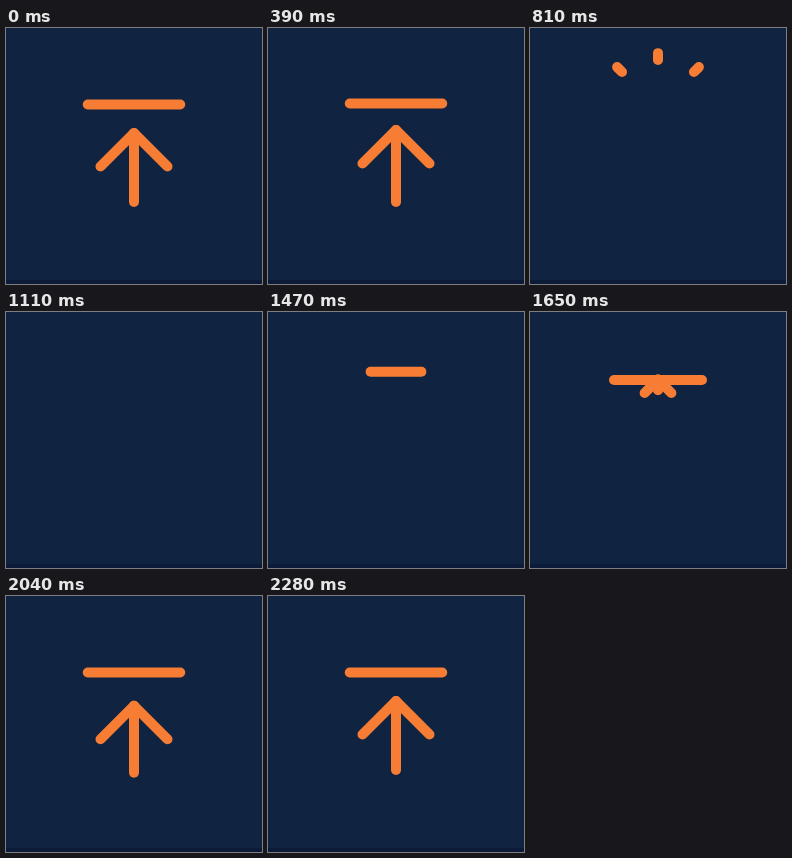
Recreate the animation shown at these times as an HTML page with a canvas. Size 256 px wide and 256 px high, loop 2.73 s.

```html
<!DOCTYPE html>
<html lang="en">
<head>
<meta charset="utf-8">
<title>Upload arrow</title>
<style>
html, body { margin: 0; width: 100%; height: 100%; overflow: hidden; background: #102341; }
canvas { display: block; width: 100vw; height: 100vh; }
</style>
</head>
<body>
<canvas id="stage"></canvas>
<script>
const SIZE = 256, LOOP = 2730, STEP = 30, CX = 128;
const canvas = document.getElementById('stage');
const ctx = canvas.getContext('2d');

const clamp = p => Math.min(1, Math.max(0, p));
const sine = p => (1 - Math.cos(Math.PI * p)) / 2;
const easeIn = n => p => p ** n;
const easeOut = n => p => 1 - (1 - p) ** n;

// Value moving from a to b between times t0 and t1
const move = (t, t0, t1, a, b, ease) => a + (b - a) * ease(clamp((t - t0) / (t1 - t0)));

function line(...pts) {
  ctx.beginPath();
  pts.forEach(([x, y], i) => i ? ctx.lineTo(x, y) : ctx.moveTo(x, y));
  ctx.stroke();
}

function bar(half, y) {
  line([CX - half, y], [CX + half, y]);
}

function arrow(tip, leg, end) {
  line([CX, tip], [CX, Math.max(tip, end)]);
  line([CX - leg, tip + leg], [CX, tip], [CX + leg, tip + leg]);
}

function leave(t) {
  if (t < 708) {
    arrow(
      move(t, 330, 690, 105, 59.5, sine),
      move(t, 510, 700, 33.5, 0, easeIn(2)),
      move(t, 330, 708, 174, 59.5, easeIn(4))
    );
  }
  if (t < 720) {
    bar(move(t, 330, 720, 46.25, 0, easeIn(3.8)), move(t, 330, 720, 76.5, 59.5, sine));
  }
}

function sparks(t) {
  const head = move(t, 712, 932, 0, 1, easeOut(3));
  const tail = Math.min(head, move(t, 766, 910, 0, 1, easeOut(3)));
  const up = p => [CX, 59.5 - 41.4 * p];
  const side = dir => p => [CX + dir * (16 + 30 * p), 64 - 30 * p];
  for (const at of [up, side(-1), side(1)]) {
    const [x, y] = at(head);
    line(at(tail), [x, y - 0.01]);
  }
}

function enter(t) {
  if (t >= 1570) {
    const settle = t > 1890;
    arrow(
      settle ? move(t, 1890, 2280, 112, 105, sine) : move(t, 1570, 1890, 60, 112, sine),
      move(t, 1605, 1805, 0, 33.5, easeOut(2)),
      settle ? move(t, 1890, 2280, 178, 174, sine) : move(t, 1567, 1890, 60, 178, sine)
    );
  }
  bar(move(t, 1365, 1815, 0, 46.25, easeOut(3)), move(t, 1440, 1860, 59.5, 76.5, sine));
}

function draw(t) {
  const w = Math.round(innerWidth * devicePixelRatio);
  const h = Math.round(innerHeight * devicePixelRatio);
  if (canvas.width !== w || canvas.height !== h) {
    canvas.width = w;
    canvas.height = h;
  }
  ctx.setTransform(w / SIZE, 0, 0, h / SIZE, 0, 0);
  ctx.fillStyle = '#102341';
  ctx.fillRect(0, 0, SIZE, SIZE);
  ctx.fillStyle = '#0c1b37';
  ctx.fillRect(0, 252, SIZE, 4);

  ctx.strokeStyle = '#f77d34';
  ctx.lineWidth = 10;
  ctx.lineCap = ctx.lineJoin = 'round';
  if (t < 720) leave(t);
  if (t >= 712 && t < 1110) sparks(t);
  if (t >= 1365) enter(t);
}

const start = performance.now();
function tick() {
  const t = (performance.now() - start) % LOOP;
  draw(Math.floor(t / STEP) * STEP);
  requestAnimationFrame(tick);
}
tick();
</script>
</body>
</html>
```
